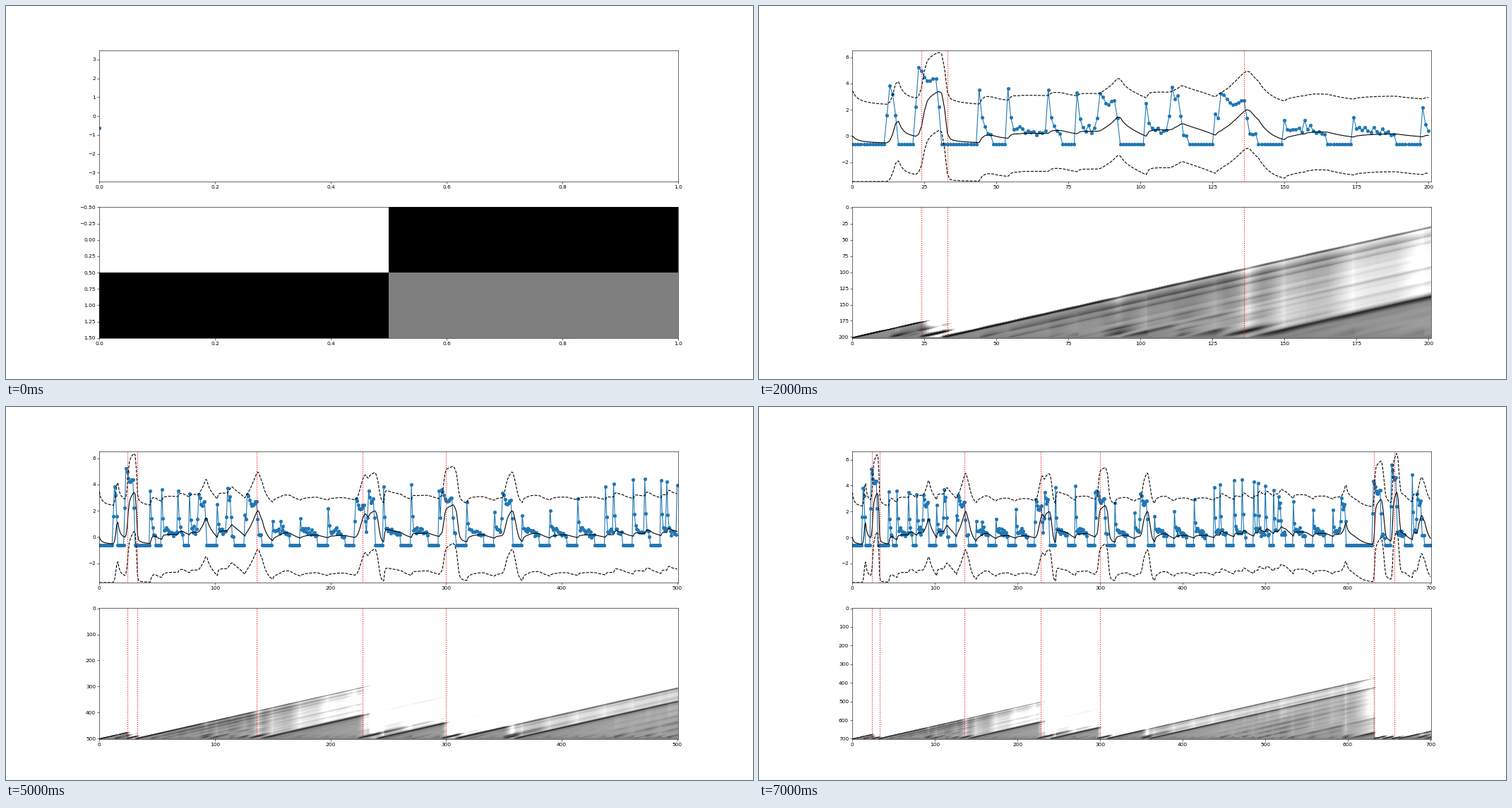
These frames come from a looping animation (1058x529 px, 8000 ms). A matplotlib script:

```python
import numpy as np
import matplotlib.pyplot as plt
from matplotlib.animation import FuncAnimation
from matplotlib.colors import LogNorm

FRAMES, STEP = 8, 100
TOTAL = 1 + STEP * (FRAMES - 1)
DRY = -0.62
PRIOR_VAR, NOISE_VAR, HAZARD = 1.0, 2.0, 0.01
CHANGE_POINTS = (24, 33, 136, 228, 300, 632, 656)

# A shower comes once a day; a few more fall in between.
DAY, FIRST_SHOWER, CALM_DAY = 24, 54, 606
EXTRA_SHOWERS = (44, 68, 157, 445, 472, 491, 500)
# First step, last step and mean level.
STORMS = (
    (13, 14, 3.2), (23, 29, 4.5), (86, 91, 2.7), (111, 113, 3.1),
    (128, 136, 2.7), (222, 229, 2.4), (233, 237, 2.9), (296, 305, 3),
    (349, 356, 2.8), (516, 518, 2.6), (592, 596, 2.5), (631, 639, 3.7),
    (653, 658, 4.8), (684, 688, 2.8),
)


def shower(series, start, drizzle, rng):
    """A sharp peak, its quick fall and a fading drizzle."""
    height = 2.2 + start / 500 + 1.3 * np.cos(2 * np.pi * (start - 53) / 208)
    fade = np.linspace(.6, .15, drizzle) + rng.normal(0, .13, drizzle)
    shape = np.concatenate(([height, .4 * height], fade))
    part = series[start:start + shape.size]
    part[:] = shape[:part.size]


def storm(series, first, last, level):
    """A plateau that sags in the middle, with half-height shoulders."""
    u = np.linspace(0, 1, last - first + 1)
    series[[first - 1, last + 1]] = level / 2
    series[first:last + 1] = level * (1.1 - .2 * u) + .3 * np.cos(2 * np.pi * u)


def make_series():
    rng = np.random.default_rng(4)
    series = np.full(TOTAL, DRY)
    for start in range(FIRST_SHOWER, TOTAL, DAY):
        if start != CALM_DAY:
            shower(series, start, 13, rng)
    for start in EXTRA_SHOWERS:
        shower(series, start, 3, rng)
    for spell in STORMS:
        storm(series, *spell)
    return series


def detect_changes(series):
    """Online run-length posterior with a Gaussian mean of known noise."""
    size = len(series)
    posterior = np.zeros((size + 1, size + 1))
    posterior[0, 0] = 1
    mean, precision = np.zeros(1), np.array([1 / PRIOR_VAR])
    log_run = np.zeros(1)
    pred_mean, pred_var = np.empty(size), np.empty(size)
    for t, x in enumerate(series):
        weight = posterior[t, :t + 1]
        var = 1 / precision + NOISE_VAR
        pred_mean[t], pred_var[t] = weight @ mean, weight @ var

        log_joint = log_run - .5 * (np.log(2 * np.pi * var) + (x - mean) ** 2 / var)
        log_change = np.logaddexp.reduce(log_joint + np.log(HAZARD))
        log_run = np.append(log_change, log_joint + np.log(1 - HAZARD))
        log_run -= np.logaddexp.reduce(log_run)
        posterior[t + 1, :t + 2] = np.exp(log_run)

        updated = precision + 1 / NOISE_VAR
        mean = np.append(0, (mean * precision + x / NOISE_VAR) / updated)
        precision = np.append(1 / PRIOR_VAR, updated)
    return posterior, pred_mean, 2 * np.sqrt(pred_var)


series = make_series()
posterior, pred_mean, band = detect_changes(series)
fig, (top, bottom) = plt.subplots(2, 1, figsize=(20, 10), dpi=52.9)
fig.subplots_adjust(hspace=.197)


def upper_limit(count):
    if count == 1:
        return band[0]
    return 6.5 if count < TOTAL else 6.6


def draw(frame):
    count = 1 + STEP * frame
    steps = np.arange(count)
    top.clear()
    bottom.clear()

    top.scatter(steps, series[:count])
    top.plot(steps, series[:count])
    top.plot(steps, pred_mean[:count], c="k")
    for sign in (-1, 1):
        top.plot(steps, (pred_mean + sign * band)[:count], c="k", ls="--")
    top.set_xlim(0, count)
    top.set_ylim(-band[0], upper_limit(count))

    bottom.imshow(np.rot90(posterior[:count + 1, :count + 1]), aspect="auto",
                  cmap="gray_r", norm=LogNorm(vmin=1e-4, vmax=1),
                  interpolation="nearest" if count < 150 else "antialiased")
    bottom.set_xlim(0, count)

    for point in CHANGE_POINTS:
        if point < count:
            for ax in (top, bottom):
                ax.axvline(point, c="red", ls="dotted")
    return []


animation = FuncAnimation(fig, draw, frames=FRAMES, init_func=lambda: [],
                          interval=1000, repeat=True, repeat_delay=0)
plt.show()
```
